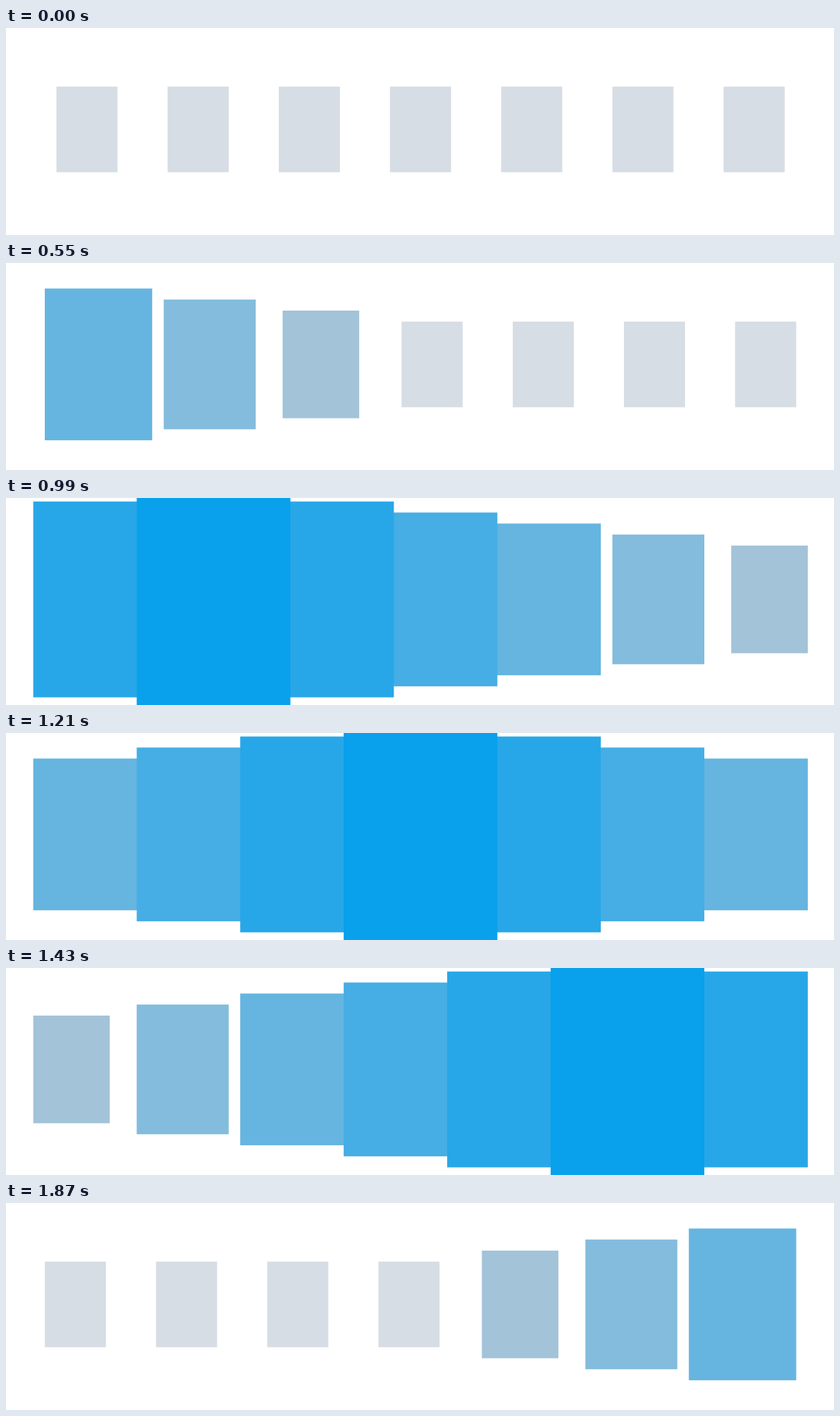
These frames come from a looping animation (1111x278 px, 1980 ms). An HTML page:

```html
<!DOCTYPE html>
<html lang="en">
<head>
<meta charset="utf-8">
<title>Wave of blocks</title>
<style>
html, body { margin: 0; width: 100%; height: 100%; overflow: hidden; background: #fff; }
svg { display: block; width: 100%; height: 100%; }
</style>
</head>
<body>
<svg id="stage" viewBox="0 0 1111 278"></svg>
<script>
const COUNT = 7, PEAK = 6, STEP = 110, LOOP = 1980;
const MID_X = 556.2, MID_Y = 136.2, PITCH = 149.2;
const stage = document.getElementById('stage');
const rects = Array.from({ length: COUNT }, () =>
  stage.appendChild(document.createElementNS('http://www.w3.org/2000/svg', 'rect')));

const halfWidth = level => 41 + 10.35 * level;
const halfHeight = level => 57.5 + 14.8 * level;
const color = level => level
  ? `rgb(${Math.round(192 - 30.5 * level)},${202 - 7 * level},${212 + 4 * level})`
  : 'rgb(215,221,228)';

// The crest passes one block per step; step 0 is the resting row.
const levelAt = (i, step) => Math.max(0, PEAK - Math.abs(step - PEAK - i));

let shown = -1;

function draw(time) {
  const step = Math.max(0, Math.floor((time % LOOP) / STEP) - 2);
  if (step === shown) return;
  shown = step;
  const blocks = Array.from({ length: COUNT }, (_, i) => ({ i, level: levelAt(i, step) }));
  // Keeps the outer edges of the row centred.
  const shift = (halfWidth(blocks[0].level) - halfWidth(blocks[COUNT - 1].level)) / 2;
  // Taller blocks lie on top.
  blocks.sort((a, b) => a.level - b.level);
  blocks.forEach(({ i, level }, n) => {
    const w = halfWidth(level), h = halfHeight(level), rect = rects[n];
    rect.setAttribute('x', MID_X + (i - (COUNT - 1) / 2) * PITCH + shift - w);
    rect.setAttribute('y', MID_Y - h);
    rect.setAttribute('width', 2 * w);
    rect.setAttribute('height', 2 * h);
    rect.setAttribute('fill', color(level));
  });
}

function tick(now) {
  draw(now);
  requestAnimationFrame(tick);
}

draw(0);
requestAnimationFrame(tick);
</script>
</body>
</html>
```
